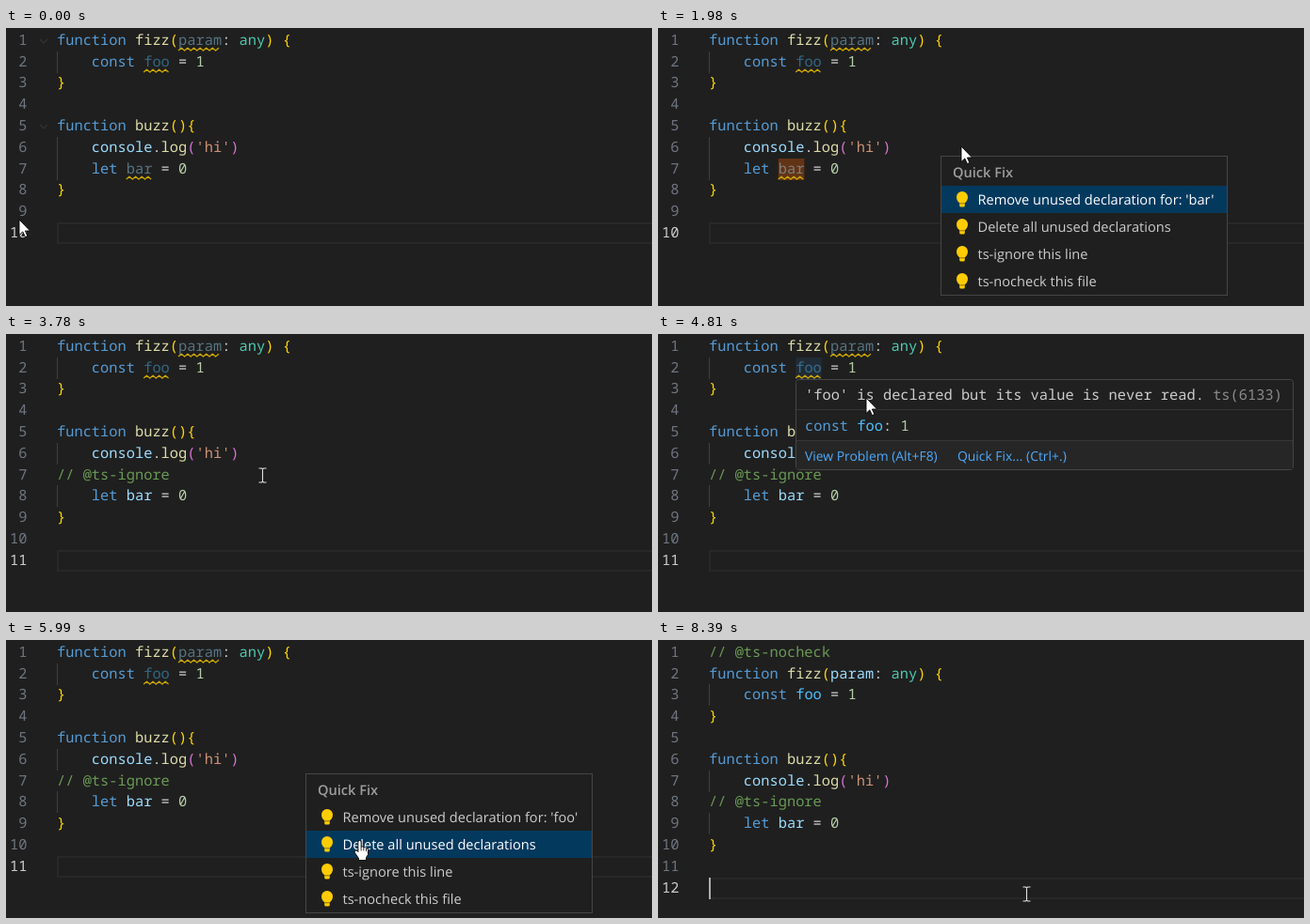
These frames come from a looping animation (686x296 px, 8470 ms). An HTML page:

```html
<!DOCTYPE html>
<html lang="en">
<head>
<meta charset="utf-8">
<title>Quick fix demo</title>
<style>
  html, body { margin: 0; width: 100%; height: 100%; overflow: hidden; background: #1f1f1f; }
  svg { display: block; width: 686px; height: 296px; }
  text { white-space: pre; font-variant-ligatures: none; text-rendering: geometricPrecision; fill: #ccc; }
  .mono { font: 15.36px "Noto Sans Mono", "DejaVu Sans Mono", monospace; }
  .ui { font: 14.6px "Open Sans", "Noto Sans", sans-serif; }
  .link { font-size: 13.9px; fill: #4daafc; }
  .head { font-weight: 600; fill: #9d9d9d; }
  .num { text-anchor: end; fill: #6e7681; }
  .on { fill: #fff; }
  .active { fill: #ccc; }
  .dim { opacity: .667; }
  .k { fill: #569cd6; } .f { fill: #dcdcaa; } .v { fill: #9cdcfe; } .c { fill: #4fc1ff; }
  .t { fill: #4ec9b0; } .n { fill: #b5cea8; } .s { fill: #ce9178; } .r { fill: #6a9955; }
  .b { fill: #ffd700; } .p { fill: #da70d6; } .o { fill: #d4d4d4; } .g { fill: #8a8a8a; }
</style>
</head>
<body>
<svg id="stage" viewBox="0 0 686 296"></svg>
<script>
const LOOP = 8470, LEFT = 54, CHAR = 9.216;
const INSERT_IGNORE = 2910, INSERT_NOCHECK = 6380;
const BAR_FIXED = 3380, ALL_FIXED = 7010;

// Caret visibility windows
const CARET = [[2990, 3540], [4020, 4490], [4970, 5440], [6380, 6930], [7390, 7930], [8390, LOOP]];
const POPUPS = [
  { word: 'bar', from: 940, to: 1900, dx: -18, dy: -6, info: [['k', 'let '], ['v', 'bar'], ['o', ': '], ['t', 'number']] },
  { word: 'foo', from: 4410, to: 5520, dx: 0, dy: 0, info: [['k', 'const '], ['c', 'foo'], ['o', ': '], ['n', '1']] }
];
const MENUS = [
  { word: 'bar', from: 1900, to: 2830, x: 300, y: 136, marked: 1980 },
  { word: 'foo', from: 5520, to: 6300, x: 318, y: 142, marked: 5520 }
];
// Pointer moves: start time, steps, end x, end y, eased
const MOVES = [
  [80, 8, 140, 155, true],
  [1100, 9, 322, 126, true],
  [2210, 7, 355, 229, true],
  [3540, 9, 155, 40, true],
  [4730, 2, 221, 68, false],
  [4888, 8, 358, 134, true],
  [5600, 2, 360, 157, false],
  [5758, 6, 391, 270, true]
];
const STEP = 78.5;

const stage = document.getElementById('stage');
const clamp = x => Math.max(0, Math.min(1, x));
const ease = x => x * x * (3 - 2 * x);
const during = (t, item) => t >= item.from && t < item.to;
const rowTop = row => Math.round(1.8 + 22.8 * row);
const baseline = row => rowTop(row) + 16;
const colX = col => LEFT + col * CHAR;

const text = (x, y, cls, body) => `<text x="${x}" y="${y}" class="${cls}">${body}</text>`;
const rect = (x, y, w, h, fill, extra = '') =>
  `<rect x="${x}" y="${y}" width="${w}" height="${h}" fill="${fill}" ${extra}/>`;
const line = (d, color, width = 1) =>
  `<path d="${d}" fill="none" stroke="${color}" stroke-width="${width}"/>`;
const spans = tokens =>
  tokens.map(([cls, body]) => `<tspan class="${cls}">${body}</tspan>`).join('');

// A word flagged as unused carries a third entry
function codeLines(t) {
  const unused = t < ALL_FIXED, barUnused = t < BAR_FIXED;
  const lines = [
    [['k', 'function '], ['f', 'fizz'], ['b', '('], ['v', 'param', unused], ['o', ': '], ['t', 'any'], ['b', ') {']],
    [['k', '    const '], ['c', 'foo', unused], ['o', ' = '], ['n', '1']],
    [['b', '}']],
    [],
    [['k', 'function '], ['f', 'buzz'], ['b', '(){']],
    [['v', '    console'], ['o', '.'], ['f', 'log'], ['p', '('], ['s', "'hi'"], ['p', ')']],
    [['k', '    let '], ['v', 'bar', barUnused], ['o', ' = '], ['n', '0']],
    [['b', '}']],
    [],
    []
  ];
  if (t >= INSERT_IGNORE) lines.splice(6, 0, [['r', '// @ts-ignore']]);
  if (t >= INSERT_NOCHECK) lines.unshift([['r', '// @ts-nocheck']]);
  return lines;
}

function squiggle(x, row, width) {
  const y = rowTop(row) + 22, half = 3.3;
  let d = `M${x} ${y}`;
  for (let i = 1; i * half <= width; i++) d += `L${x + i * half} ${y - (i % 2) * 2.8}`;
  return `<path d="${d}" fill="none" stroke="#cca700" stroke-width="1.3" stroke-linejoin="round"/>`;
}

function drawCode(t, marks) {
  const lines = codeLines(t), last = lines.length - 1;
  let out = rect(LEFT + 1, rowTop(last) + 1, 700, 21, 'none', 'stroke="#282828" stroke-width="2"');
  lines.forEach((tokens, row) => {
    const y = baseline(row);
    let col = 0, under = '', body = '';
    for (const [cls, word, unused] of tokens) {
      const x = colX(col), width = word.length * CHAR;
      if (marks[word]) under += rect(x, rowTop(row), width, 23, marks[word]);
      if (unused) under += squiggle(x, row, width);
      body += `<tspan class="${cls}${unused ? ' dim' : ''}" ${unused ? 'fill-opacity=".667"' : ''}>${word}</tspan>`;
      col += word.length;
    }
    if (tokens.length && tokens[0][1].startsWith('    ')) under += rect(LEFT, rowTop(row), 1, 23, '#404040');
    out += text(22.4, y, row === last ? 'mono num active' : 'mono num', row + 1) + under;
    if (body) out += text(LEFT, y, 'mono', body);
  });
  if (CARET.some(([a, b]) => t >= a && t < b)) out += rect(LEFT, rowTop(last), 2, 23, '#aeafad');
  return out;
}

function drawFolds(t) {
  const alpha = t < 240 ? .12 + t / 600 : .52 * clamp((560 - t) / 320);
  if (!alpha) return '';
  return [0, 4].map(row => `<g opacity="${alpha.toFixed(3)}">` +
    line(`M36 ${rowTop(row) + 10}l4 4l4 -4`, '#ccc', 1.2) + '</g>').join('');
}

function drawPopup(popup, t) {
  const alpha = clamp((t - popup.from + 60) / 140).toFixed(3);
  return `<g transform="translate(${popup.dx} ${popup.dy})" opacity="${alpha}">` +
    rect(146.5, 48.5, 528, 96, '#202020', 'rx="3" stroke="#454545"') +
    rect(147, 114, 527, 30, '#262626') +
    line('M147 80.5H674M147 113.5H674', '#363636') +
    text(156, 70, 'mono', `'${popup.word}' is declared but its value is never read. <tspan class="g">ts(6133)</tspan>`) +
    text(156, 103, 'mono', spans(popup.info)) +
    text(156, 135, 'ui link', 'View Problem (Alt+F8)') +
    text(318, 135, 'ui link', 'Quick Fix... (Ctrl+.)') + '</g>';
}

const bulb = (x, y) =>
  `<path transform="translate(${x} ${y})" fill="#fc0" d="M-2.8 4.2Q-6 1.8 -6 -2A6 6 0 0 1 6 -2Q6 1.8 2.8 4.2V7Q2.8 8.5 1.4 8.5H-1.4Q-2.8 8.5 -2.8 7Z"/>` +
  line(`M${x - 2.8} ${y + 4.8}h5.6`, '#6b5a10', .8);

function drawMenu(menu, selected) {
  const { x, y } = menu;
  const labels = [`Remove unused declaration for: '${menu.word}'`, 'Delete all unused declarations', 'ts-ignore this line', 'ts-nocheck this file'];
  return rect(x + .5, y + .5, 304, 148, '#1f1f1f', 'stroke="#454545"') +
    text(x + 13, y + 23, 'ui head', 'Quick Fix') +
    labels.map((label, i) => {
      const top = y + 32 + 29 * i, on = i === selected;
      return (on ? rect(x + 1, top, 303, 29, '#04395e') : '') +
        bulb(x + 23, top + 14) + text(x + 39.5, top + 20, on ? 'ui on' : 'ui', label);
    }).join('');
}

function pointerAt(t) {
  let x = 14, y = 204;
  for (const [start, steps, endX, endY, eased] of MOVES) {
    if (t < start) break;
    const p = clamp((Math.floor((t - start) / STEP) + 1) / steps);
    const k = eased ? ease(p) : p;
    x += (endX - x) * k;
    y += (endY - y) * k;
  }
  return { x, y };
}

// -1: nothing selected
function selectedItem(menu, { x, y }) {
  const inside = x > menu.x && x < menu.x + 305 && y >= menu.y && y < menu.y + 149;
  return inside ? Math.max(-1, Math.min(3, Math.floor((y - menu.y - 32) / 29))) : 0;
}

function pointerKind({ x, y }, popup, menu) {
  if (menu) return y >= menu.y + 32 ? 'hand' : 'arrow';
  if (popup) {
    const px = x - popup.dx, py = y - popup.dy;
    if (px > 146 && px < 675 && py > 48 && py < 145)
      return py > 118 && (px < 300 || (px > 317 && px < 434)) ? 'hand' : 'arrow';
  }
  return x < LEFT ? 'arrow' : 'beam';
}

const POINTERS = {
  arrow: '<path d="M0 0V16.5L3.8 12.9L6.4 18.6L8.9 17.5L6.4 12H11.6Z" fill="#fff" stroke="#000" stroke-width=".9"/>',
  hand: '<path d="M-1.6 12V1.5A1.6 1.6 0 0 1 1.6 1.5V7Q3 5.6 4.3 7.5Q6 6.5 7 8.4Q9 7.6 9 10V15L7 18V21H-1V19L-5.4 12.6Q-5.6 9.6 -3 10.6Z" fill="#fff" stroke="#000" stroke-width=".9"/>' +
    line('M1.6 7V11M4.3 8V11M7 8.6V11.5', '#000', .8),
  beam: line('M-4 -7.5H-1L0 -6.5L1 -7.5H4M0 -6.5V6.5M-4 7.5H-1L0 6.5L1 7.5H4', '#e0e0e0', 1.1)
};

function render(t) {
  const popup = POPUPS.find(item => during(t, item));
  const menu = MENUS.find(item => during(t, item));
  const pointer = pointerAt(t);
  const selected = menu ? selectedItem(menu, pointer) : -1;
  const marks = {};
  if (popup) marks[popup.word] = '#212b35';
  if (menu && selected === 0 && t >= menu.marked) marks[menu.word] = '#633315';
  const snapped = kind => kind === 'beam' ? [Math.round(pointer.x) + .5, Math.round(pointer.y) + .5] : [pointer.x, pointer.y];
  const kind = pointerKind(pointer, popup, menu);
  return drawCode(t, marks) + drawFolds(t) +
    (popup ? drawPopup(popup, t) : '') +
    (menu ? drawMenu(menu, selected) : '') +
    `<g transform="translate(${snapped(kind).join(' ')})">${POINTERS[kind]}</g>`;
}

const begin = performance.now();
let shown = '';
function tick() {
  const markup = render((performance.now() - begin) % LOOP);
  if (markup !== shown) stage.innerHTML = shown = markup;
  requestAnimationFrame(tick);
}
tick();
</script>
</body>
</html>
```
